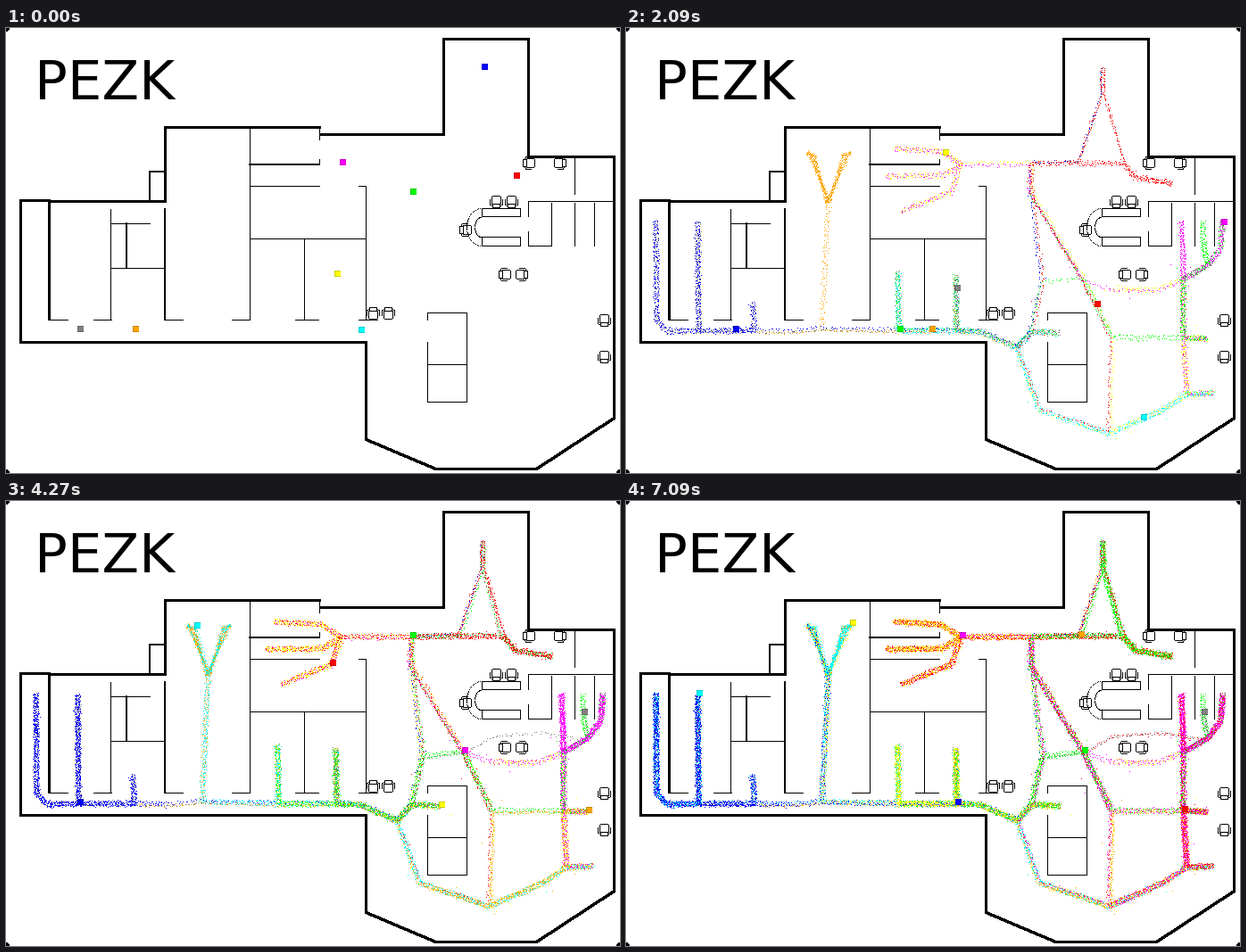
These frames come from a looping animation (688x499 px, 7120 ms). A matplotlib script:

```python
import numpy as np
import matplotlib.pyplot as plt
from matplotlib.animation import FuncAnimation

W, H, DPI = 688, 499, 100
FRAMES, INTERVAL = 178, 40
KEYS = [0, 31, 72, 106, 131, 149, 177]
SPEED = 42      # pixels per frame
SPACING = 2.4   # pixels between trail dots
HALL = 340      # height of the long corridor
STALL = 216     # top of the stalls on the right

# Way points by letter; CHAINS tells which are joined
SPOTS = {
    "b": (46, HALL), "7": (181, HALL), "G": (219, 337), "Q": (396, HALL), "R": (438, 358),
    "S": (454, HALL), "T": (486, 342), "U": (466, 286), "V": (512, 281), "W": (454, 185),
    "X": (454, 152), "Y": (375, 152), "z": (352, 138), "Z": (300, 135), "y": (355, 165),
    "a": (291, 166), "d": (364, 183), "c": (308, 205), "e": (330, 197), "f": (508, 151),
    "g": (556, 151), "h": (534, 75), "i": (534, 45), "j": (570, 167), "k": (612, 174),
    "l": (463, 428), "m": (541, 454), "n": (544, 347), "o": (651, 348), "p": (624, 347),
    "q": (624, 281), "r": (622, STALL), "s": (651, 266), "t": (666, 246),
    "u": (668, STALL), "v": (646, 238), "w": (646, STALL), "x": (628, 410),
    "0": (658, 409), "1": (545, 262), "2": (600, 258), "3": (545, 292), "4": (595, 293),
    "5": (598, 419), "6": (603, 427),
}
for top, foot, x, y in [("A", "B", 33, 215), ("C", "D", 80, 217), ("E", "F", 142, 307),
                        ("M", "N", 304, 273), ("O", "P", 369, 277)]:
    SPOTS[top], SPOTS[foot] = (x, y), (x + 1, HALL - (12 if foot == "B" else 1))
SPOTS["H"] = (226, 195)
for outer, inner, side in [("I", "J", -1), ("L", "K", 1)]:
    SPOTS[outer], SPOTS[inner] = (227 + 25 * side, 138), (227 + 15 * side, 141)
CHAINS = ("ABbDF7GNPQRSUWXfgjk CD EF GHIJHKLH MN OP ST UVW VnmlR npo XYzZ Yya Ydc "
          "ced fhi gh V12s V34q rqpx0 qstu svw m5x m6x").split()

# Each word: the way point held at a key time, then the beat walked until the next
AGENTS = [
    ((0, 0, 255), "iACE EACE 7ACE DCAEIJKL EAC DACIJKL P"),
    ((255, 0, 255), "YZacru qru0o orqu Vxomr oxmo XnmRX Y"),
    ((0, 255, 0), "Wouw vnTOM QTOMik Xik hik WTnk V"),
    ((255, 0, 0), "jkimR fkin ikZac dcZa tur0m mo0ur p"),
    ((255, 255, 0), "O0o3 mZac eaTOM TMO PMOT PMOIJ L"),
    ((0, 255, 255), "QMOT0 SM0KLIJ JKLMIJ JIJKL JKLEIJ EAC C"),
    ((255, 165, 0), "FIJKL HIJKLT0 0mlno oXZa YZak gkiZac f"),
    ((128, 128, 128), "DCAE MOT v v q v v"),
]

index = {name: i for i, name in enumerate(SPOTS)}
places = np.array(list(SPOTS.values()), float)
count = len(places)
dist = np.full((count, count), np.inf)
hop = np.tile(np.arange(count), (count, 1))
np.fill_diagonal(dist, 0)
for chain in CHAINS:
    for u, v in zip(chain, chain[1:]):
        i, j = index[u], index[v]
        dist[i, j] = dist[j, i] = np.hypot(*(places[i] - places[j]))
for k in range(count):
    via = dist[:, k, None] + dist[k]
    better = via < dist - 1e-9
    dist = np.where(better, via, dist)
    hop = np.where(better, hop[:, k, None], hop)


def patrol(start, beat, goal, budget):
    """Walk the beat round and round, leaving in time to reach the goal."""
    stops, run, step = [index[start]], 0, 0
    end = index[goal]
    while beat:
        new = index[beat[step % len(beat)]]
        ahead = run + dist[stops[-1], new]
        if ahead + dist[new, end] > budget * 1.1:
            break
        stops.append(new)
        run, step = ahead, step + 1
    way = stops[:1]
    for stop in stops[1:] + [end]:
        while way[-1] != stop:
            way.append(hop[way[-1], stop])
    return places[way]


def along(pts, s):
    """Points at distances s along a polyline."""
    run = np.concatenate([[0], np.cumsum(np.hypot(*np.diff(pts, axis=0).T))])
    return np.column_stack([np.interp(s, run, axis) for axis in pts.T])


rng = np.random.default_rng(8)
track = np.zeros((FRAMES, len(AGENTS), 2))
dots, shades, times = [], [], []
for a, (color, plan) in enumerate(AGENTS):
    words = plan.split()
    for word, following, t0, t1 in zip(words, words[1:], KEYS, KEYS[1:]):
        pts = patrol(word[0], word[1:], following[0], SPEED * (t1 - t0))
        total = np.hypot(*np.diff(pts, axis=0).T).sum()
        n = np.arange(t0, t1 + 1)
        track[n, a] = along(pts, (n - t0) / (t1 - t0) * total)
        if not total:
            continue
        # Scattered trail, kept slightly to the right of the way
        s = np.arange(0, total, SPACING)
        s += rng.uniform(-1, 1, len(s))
        p = along(pts, s)
        d = along(pts, s + 1) - along(pts, s - 1)
        d /= np.maximum(np.hypot(*d.T), 1e-6)[:, None]
        stray = (rng.random(len(s)) < 0.01) & (p[:, 0] > 440) & (p[:, 1] > 250)
        spread = np.where(stray, 10, 0.95)[:, None]
        p += 1.6 * np.column_stack([-d[:, 1], d[:, 0]]) + rng.normal(size=p.shape) * spread
        dots.append(p)
        shades.append(np.tile(color, (len(s), 1)))
        times.append(t0 + s / total * (t1 - t0))

times = np.concatenate(times)
order = np.argsort(times, kind="stable")
times = times[order]
col, row = np.rint(np.concatenate(dots)[order]).astype(int).T
col, row = np.clip(col, 0, W - 1), np.clip(row, 0, H - 1)
shades = np.concatenate(shades)[order].astype(np.uint8)

# Floor plan, drawn without smoothing
yy, xx = np.indices((H, W))
floor = np.full((H, W, 3), 255, np.uint8)
floor[np.hypot(np.minimum(xx, W - 1 - xx), np.minimum(yy, H - 1 - yy)) < 3.5] = 0


def line(width, *pts):
    for (x0, y0), (x1, y1) in zip(pts, pts[1:]):
        n = int(max(abs(x1 - x0), abs(y1 - y0))) + 1
        x = np.rint(np.linspace(x0, x1, n)).astype(int) - width // 2
        y = np.rint(np.linspace(y0, y1, n)).astype(int) - width // 2
        for i in range(width):
            for j in range(width):
                floor[y + j, x + i] = 0


def across(y, *spans, width=1):
    for x0, x1 in spans:
        line(width, (x0, y), (x1, y))


def down(x, *spans, width=1):
    for y0, y1 in spans:
        line(width, (x, y0), (x, y1))


def box(x0, y0, x1, y1):
    line(1, (x0, y0), (x1, y0), (x1, y1), (x0, y1), (x0, y0))


def chair(x, y, turn):
    """Seat, back and arms; the back points down and turns in quarters."""
    seat = [-4 - 6j, 4 - 6j, 5 - 5j, 5 + 3j, -5 + 3j, -5 - 5j, -4 - 6j]
    back = [-4 + 4j, -4 + 7j, 4 + 7j, 4 + 4j]
    arms = [[side - 2j, side + 4j, side * 5 / 7 + 5j] for side in (-7, 7)]
    for part in (seat, back, *arms):
        spun = [q * 1j ** turn for q in part]
        line(1, *[(x + q.real, y + q.imag) for q in spun])


DOOR = 327
line(3, (352, 119), (490, 119), (490, 12), (585, 12), (585, 144), (681, 144), (681, 437),
     (594, 494), (481, 494), (403, 461), (403, 352), (16, 352), (16, 193), (48, 193),
     (48, DOOR - 1))
line(3, (48, 194), (178, 194), (178, 111), (351, 111))
line(2, (178, 161), (161, 161), (161, 194))
# Rooms along the corridor
across(DOOR, (48, 69), (98, 118), (178, 198), (253, 273), (324, 350), (395, 416))
for x, top in [(117, 203), (273, 111), (334, 236), (403, 177)]:
    down(x, (top, DOOR))
down(178, (203, DOOR), width=2)
down(135, (219, 269), width=2)
across(219, (117, 161))
across(269, (117, 178))
down(351, (111, 125), (147, 152))
across(153, (273, 351), width=2)
across(177, (273, 351), (395, 403))
across(236, (273, 403))
# Block in the middle and stalls on the right
line(1, (472, 327), (472, 319), (516, 319), (516, 419), (472, 419), (472, 352))
across(377, (472, 516))
across(194, (585, 681))
across(244, (585, 611))
down(585, (194, 211), (228, 244))
down(637, (144, 186))
for x in (611, 637, 659):
    down(x, (196, 244))
# Round desk
box(533, 202, 576, 211)
box(533, 234, 576, 244)
bend = np.linspace(np.pi / 2, 3 * np.pi / 2, 30)
for rx, ry in ((17, 21), (8, 11.5)):
    line(1, *zip(533 + rx * np.cos(bend), 223 + ry * np.sin(bend)))

for x, y, turn in [(586, 151, 1), (620, 151, 3), (549, 194, 0), (566, 194, 0),
                   (515, 226, 1), (559, 276, 1), (577, 276, 3), (411, 320, 2),
                   (428, 320, 2), (670, 327, 0), (670, 368, 0)]:
    chair(x, y, turn)

fig = plt.figure(figsize=(W / DPI, H / DPI), dpi=DPI, facecolor="white")
ax = fig.add_axes([0, 0, 1, 1])
view = ax.imshow(floor, interpolation="nearest", aspect="auto")
ax.set(xlim=(-0.5, W - 0.5), ylim=(H - 0.5, -0.5))
ax.axis("off")
ax.text(31, 79, "PEZK", family="DejaVu Sans", size=61 * 72 / DPI, va="baseline")


def draw(n):
    seen = np.searchsorted(times, n, side="right") if n else 0
    img = floor.copy()
    img[row[:seen], col[:seen]] = shades[:seen]
    # Robots stand a little up and right of their trail
    spots = np.rint(track[n] + (2, -2)).astype(int)
    for (x, y), (color, _) in zip(spots, AGENTS):
        img[y - 3:y + 4, x - 3:x + 4] = np.multiply(color, 0.8)
        img[y - 2:y + 3, x - 2:x + 4] = color
    view.set_data(img)
    return (view,)


anim = FuncAnimation(fig, draw, frames=FRAMES, interval=INTERVAL, repeat=True,
                     repeat_delay=0, blit=False)
plt.show()
```
